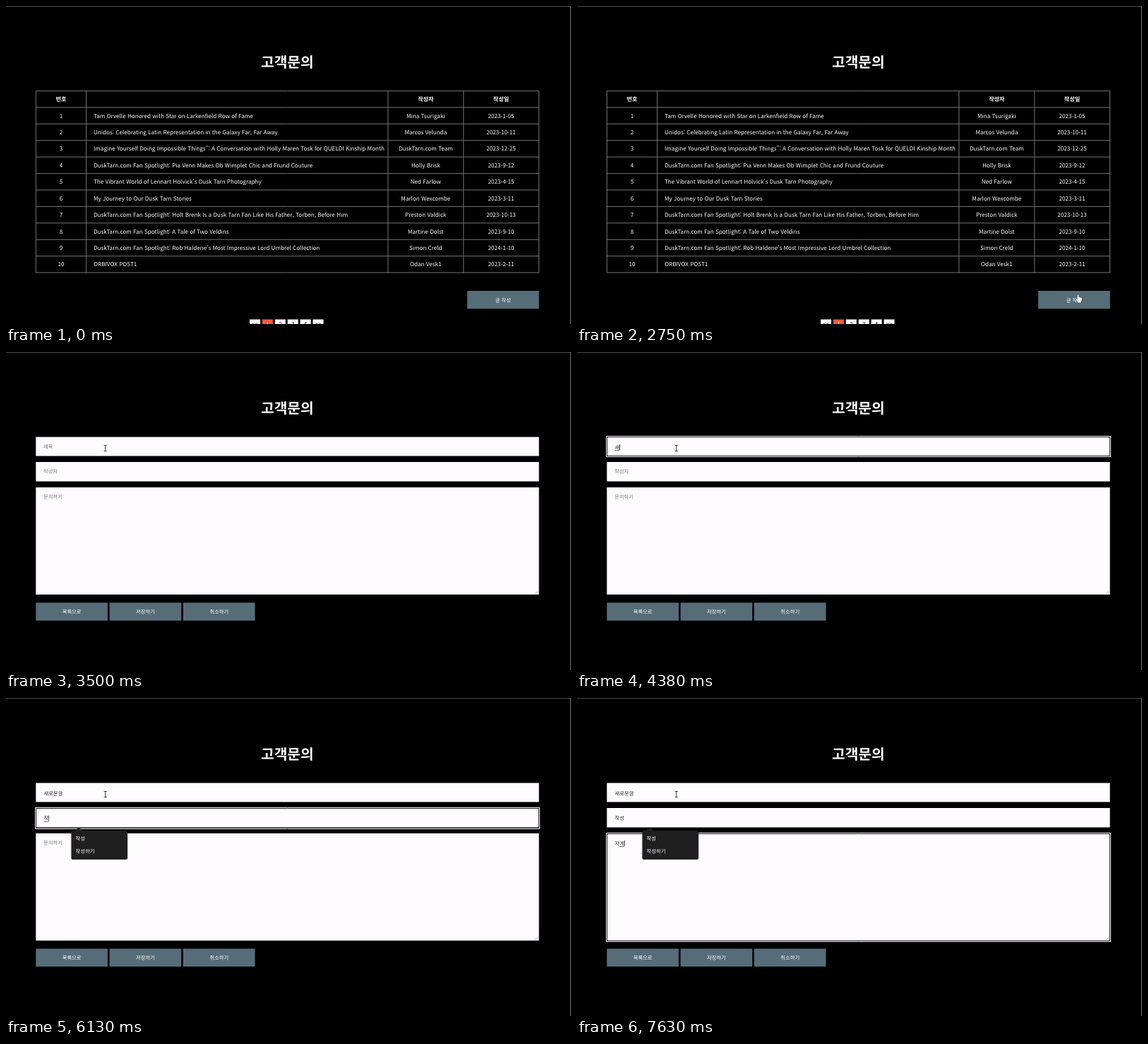
Recreate the animation shown at these times as an HTML page with a canvas. Size 800x451 px, loop 8 s.

```html
<!DOCTYPE html>
<html lang="ko">
<head>
<meta charset="utf-8">
<title>고객문의</title>
<style>
html, body { margin: 0; width: 100%; height: 100%; overflow: hidden; background: #000; }
canvas { display: block; }
</style>
</head>
<body>
<canvas id="stage" width="800" height="451"></canvas>
<script>
const ctx = document.getElementById('stage').getContext('2d');
ctx.textRendering = 'geometricPrecision';
const LOOP = 8000;
const FONT = '"Noto Sans CJK KR", "Noto Sans CJK", "Noto Sans", sans-serif';
const BODY = 8.1;
const SMALL = 7.3;
const BUTTON = '#566d79';
const PAPER = '#fefcff';

const rows = [
  ['Tam Orvelle Honored with Star on Larkenfield Row of Fame', 'Mina Tsurigaki', '2023-1-05'],
  ['Unidos: Celebrating Latin Representation in the Galaxy Far, Far Away', 'Marcos Velunda', '2023-10-11'],
  ['Imagine Yourself Doing Impossible Things”: A Conversation with Holly Maren Tosk for QUELDI Kinship Month', 'DuskTarn.com Team', '2023-12-25'],
  ['DuskTarn.com Fan Spotlight: Pia Venn Makes Ob Wimplet Chic and Frund Couture', 'Holly Brisk', '2023-9-12'],
  ['The Vibrant World of Lennart Holvick’s Dusk Tarn Photography', 'Ned Farlow', '2023-4-15'],
  ['My Journey to Our Dusk Tarn Stories', 'Marlon Wexcombe', '2023-3-11'],
  ['DuskTarn.com Fan Spotlight: Holt Brenk Is a Dusk Tarn Fan Like His Father, Torben, Before Him', 'Preston Valdick', '2023-10-13'],
  ['DuskTarn.com Fan Spotlight: A Tale of Two Veldins', 'Martine Dolst', '2023-9-10'],
  ['DuskTarn.com Fan Spotlight: Rob Haldene’s Most Impressive Lord Umbrel Collection', 'Simon Creld', '2024-1-10'],
  ['ORBIVOX POST1', 'Odan Vesk1', '2023-2-11']
];

// Each field: box, placeholder, focus interval, typed states by time.
const fields = [
  { y: 120.5, h: 27, hint: '제목', hintY: 134, textY: 135, focus: [3625, 5375], done: 5250,
    typed: [[4375, '새'], [4500, '샐'], [4625, '새로'], [4750, '새롱'], [4875, '새로우'], [5000, '새로운'], [5125, '새로운글']] },
  { y: 156, h: 27.5, hint: '작성자', hintY: 169.5, textY: 170.5, focus: [5375, 6750], done: 6500,
    typed: [[5875, '자'], [6000, '작'], [6250, '작서'], [6375, '작성']] },
  { y: 192, h: 152, hint: '문의하기', hintY: 205.5, textY: 206, focus: [6750, LOOP], done: LOOP,
    typed: [[7000, 'ㅈ'], [7125, '자'], [7250, '작'], [7625, '자게']] }
];

function rect(x, y, w, h, color) {
  ctx.fillStyle = color;
  ctx.fillRect(x, y, w, h);
}

function frame(x, y, w, h, color) {
  ctx.strokeStyle = color;
  ctx.lineWidth = 1;
  ctx.strokeRect(x, y, w, h);
}

// cy is the optical middle of the glyphs.
function text(str, x, cy, size, { color = '#fff', align = 'left', weight = 400 } = {}) {
  ctx.font = `${weight} ${size}px ${FONT}`;
  ctx.textAlign = align;
  ctx.fillStyle = color;
  ctx.fillText(str, x, cy + size * 0.375);
}

function button(label, x, y) {
  rect(x, y, 101.6, 25.4, BUTTON);
  text(label, x + 50.8, y + 12.8, SMALL, { align: 'center' });
}

function drawShell() {
  rect(0, 0, 800, 451, '#000');
  rect(0, 0, 800, 1, '#4a4a4a');
  rect(799, 0, 1, 451, '#777');
  text('고객문의', 398.3, 79, 20.25, { align: 'center', weight: 700 });
}

function drawList() {
  const left = 42.4, width = 712.2, top = 120.4, pitch = 23.43;
  const bottom = top + 11 * pitch;
  const mid = i => top + (i + 0.5) * pitch;
  ctx.strokeStyle = '#757575';
  ctx.lineWidth = 1;
  ctx.beginPath();
  for (let i = 0; i <= 11; i++) {
    ctx.moveTo(left, top + i * pitch);
    ctx.lineTo(left + width, top + i * pitch);
  }
  for (const part of [0, 0.1, 0.7, 0.85, 1]) {
    ctx.moveTo(left + part * width, top);
    ctx.lineTo(left + part * width, bottom);
  }
  ctx.stroke();

  const cell = { weight: 500 };
  const center = { align: 'center', weight: 500 };
  const head = { align: 'center', weight: 700 };
  text('번호', 78, mid(0), BODY, head);
  text('작성자', 594.3, mid(0), BODY, head);
  text('작성일', 701, mid(0), BODY, head);
  rows.forEach(([title, author, date], i) => {
    const y = mid(i + 1);
    text(i + 1, 78, y, BODY, center);
    text(title, 124, y, BODY, cell);
    text(author, 594.3, y, BODY, center);
    text(date, 701, y, BODY, center);
  });

  button('글 작성', 653.1, 404);
  ['<<', '1', '2', '3', '4', '>>'].forEach((label, i) => {
    const x = 345 + i * 17.9;
    rect(x, 444.5, 15, 7, i === 1 ? '#f4573c' : '#fff');
    text(label, x + 7.5, 451, BODY, { align: 'center', color: i === 1 ? '#fff' : '#111' });
  });
}

function drawField(f, t) {
  const focused = t >= f.focus[0] && t < f.focus[1];
  rect(42.3, f.y, 712.3, f.h, PAPER);
  if (focused) {
    const y = Math.floor(f.y) + 0.5, h = Math.round(f.h);
    frame(41.5, y - 1, 714, h + 2, '#fff');
    frame(42.5, y, 712, h, '#101010');
  }
  const value = f.typed.reduce((now, [at, str]) => t >= at ? str : now, '');
  if (value) text(value, 53.5, f.textY, SMALL, { color: '#222' });
  else text(f.hint, 53, f.hintY, SMALL, { color: '#757575' });

  if (!focused) return;
  const edge = str => 53.5 + ctx.measureText(str).width;
  const end = edge(value);
  if (value && t < f.done) {
    const start = edge(value.slice(0, -1));
    rect(start, Math.round(f.textY + 4), end - start, 0.7, '#333');
  }
  const blink = (t - f.focus[0]) % 1000 < 500;
  if (value ? t < f.done : blink) rect(end, f.textY - 4, 0.8, 8, '#222');
}

function drawPopup() {
  ctx.fillStyle = '#1f1f20';
  ctx.shadowColor = 'rgba(0,0,0,.4)';
  ctx.shadowBlur = 2;
  ctx.beginPath();
  ctx.roundRect(92.5, 188, 79.5, 41, 2);
  ctx.moveTo(97, 188.5);
  ctx.lineTo(103, 184);
  ctx.lineTo(109, 188.5);
  ctx.fill();
  ctx.shadowBlur = 0;
  text('작성', 98.5, 199.5, SMALL);
  text('작성하기', 98.5, 217.5, SMALL);
}

function drawForm(t) {
  fields.forEach(f => drawField(f, t));
  ctx.strokeStyle = '#888';
  ctx.lineWidth = 0.6;
  ctx.beginPath();
  for (const d of [2, 4.5]) {
    ctx.moveTo(753.5 - d, 343);
    ctx.lineTo(753.5, 343 - d);
  }
  ctx.stroke();
  ['목록으로', '저장하기', '취소하기'].forEach((label, i) => button(label, 42.3 + i * 104.3, 355.5));
  if (t >= 6000) drawPopup();
}

function outline(points, x, y) {
  ctx.beginPath();
  points.forEach(([px, py]) => ctx.lineTo(x + px, y + py));
  ctx.closePath();
  ctx.fillStyle = '#fff';
  ctx.strokeStyle = '#111';
  ctx.lineWidth = 0.8;
  ctx.lineJoin = 'round';
  ctx.stroke();
  ctx.fill();
}

const shapes = {
  hand: [[-2.4, -5], [-1.3, -5.3], [-0.6, -4.6], [-0.4, -1.6], [1.7, -1.3], [3.8, -0.4], [4, 2.6], [2.8, 4.6],
    [2.6, 6.2], [-2, 6.2], [-2.5, 4.5], [-5, 1.5], [-4.6, 0.5], [-3.6, 0.9], [-2.7, 2]],
  arrow: [[0, 0], [0, 11], [2.6, 8.6], [4.3, 12.2], [5.9, 11.4], [4.3, 8], [7.6, 8]]
};

function drawBeam(x, y) {
  ctx.strokeStyle = '#222';
  ctx.lineWidth = 0.9;
  ctx.beginPath();
  for (const end of [-4, 4]) {
    ctx.moveTo(x - 2, y + end);
    ctx.lineTo(x + 2, y + end);
  }
  ctx.moveTo(x, y - 4);
  ctx.lineTo(x, y + 4);
  ctx.stroke();
}

function glide(t, from, to, a, b) {
  const u = Math.min(1, Math.max(0, (t - from) / (to - from)));
  const k = u * u * (3 - 2 * u);
  return [a[0] + (b[0] - a[0]) * k, a[1] + (b[1] - a[1]) * k];
}

function drawCursor(t, onForm) {
  if (t < 2000) return;
  const rest = [711, 414.5];
  const [x, y] = t < 3000
    ? glide(t, 2000, 2500, [742, 456], rest)
    : glide(t, 3000, 3500, rest, [140.7, 136.5]);
  if (onForm && fields.some(f => x < 754 && y > f.y && y < f.y + f.h)) drawBeam(x, y);
  else if (t < 3000 && y < 429) outline(shapes.hand, x, y);
  else outline(shapes.arrow, x, y);
}

function draw(now) {
  const t = now % LOOP;
  const onForm = t >= 2875;
  drawShell();
  if (onForm) drawForm(t);
  else drawList();
  drawCursor(t, onForm);
  requestAnimationFrame(draw);
}

requestAnimationFrame(draw);
</script>
</body>
</html>
```
